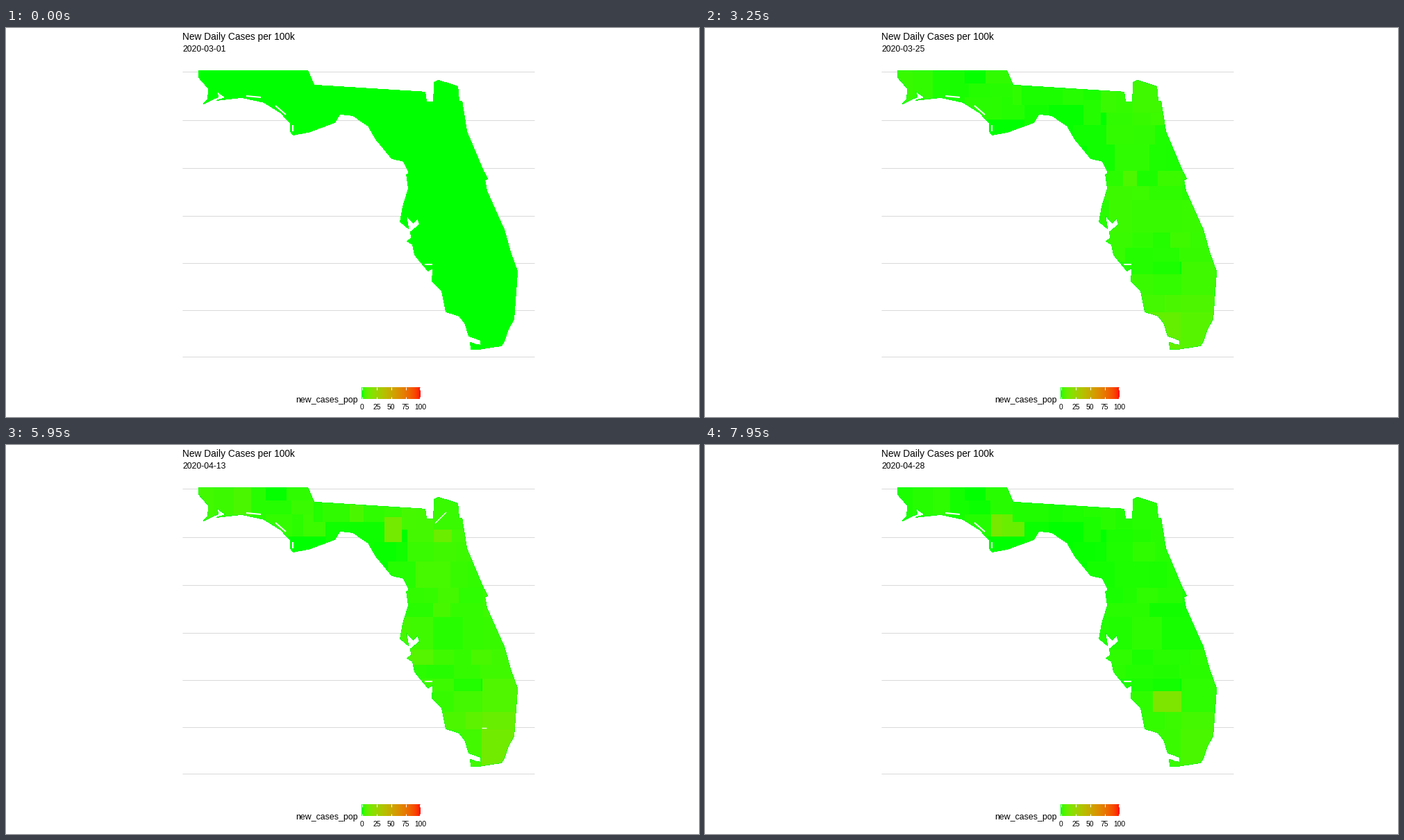
Animation, 998 px wide and 561 px high, one loop 8 s. Source, as a matplotlib script:

```python
import numpy as np
import matplotlib.pyplot as plt
from matplotlib.animation import FuncAnimation
from matplotlib.collections import LineCollection, PolyCollection
from matplotlib.patches import Polygon

W, H, DPI = 998, 561, 100
FRAMES, INTERVAL = 160, 50
DAYS_PER_FRAME = 0.3645
PX = 72 / DPI
FONT = "Liberation Sans"

# State outline, clockwise from the north-west corner
STATE = np.array([
    (278, 62), (435, 62), (444, 83), (604, 93), (606, 107), (616, 107), (617, 79),
    (623, 76), (651, 85), (653, 106), (657, 106), (664, 150), (688, 207), (694, 218),
    (690, 220), (693, 236), (718, 292), (727, 324), (737, 352), (732, 420),
    (723, 437), (718, 452), (714, 459), (682, 464), (670, 464), (669, 454),
    (677, 457), (684, 458), (684, 451), (667, 445), (661, 426), (653, 416),
    (634, 410), (628, 380), (614, 366), (615, 347), (608, 351), (589, 328),
    (586, 313), (578, 308), (584, 304), (583, 295), (596, 284), (593, 275),
    (587, 282), (577, 271), (580, 290), (568, 280), (572, 258), (580, 232),
    (577, 212), (581, 210), (573, 193), (556, 189), (533, 161), (522, 142),
    (500, 127), (481, 125), (474, 137), (436, 151), (414, 155), (410, 150),
    (410, 138), (396, 123), (372, 108), (340, 101), (304, 105), (317, 101),
    (304, 92), (306, 100), (285, 110), (291, 103), (292, 88), (278, 72)]) - (.4, .7)
BAYS = [[(346, 98), (367, 100)], [(388, 112), (403, 125)],
        [(603, 341), (614, 341)], [(413, 140), (413, 149)]]
CRACKS = [[(618, 113), (634, 97)], [(685, 408), (692, 408)]]

boxes = []


def row(y0, y1, *edges):
    """Cut a band of land into districts at the given x positions."""
    for x0, x1 in zip(edges, edges[1:]):
        boxes.append([(x0, y0), (x1, y0), (x1, y1), (x0, y1)])


row(60, 112, 270, 299, 328, 353, 380)
row(60, 80, 374, 404, 445)
row(80, 100, 380, 411, 445)
row(100, 132, 374, 412, 428, 460)
row(83, 111, 443, 456, 495, 515, 545)
row(111, 168, 460, 495, 550)
row(86, 104, 545, 578)
row(104, 140, 545, 570)
row(90, 122, 570, 591, 616)
row(74, 122, 616, 662)
row(122, 147, 578, 616, 642, 670)
row(140, 170, 530, 562, 578, 616, 648, 680)
row(168, 206, 550, 590, 640, 665, 700)
row(206, 228, 570, 602, 622, 652, 687, 700)
row(228, 248, 570, 615, 640, 687, 720)
row(248, 295, 560, 582, 615, 658, 687, 725)
row(295, 317, 574, 615, 645, 670, 699, 730)
row(317, 337, 580, 605, 645, 683, 740)
row(337, 355, 595, 645, 684)
row(337, 385, 686, 740)
row(355, 385, 610, 645, 686)
row(385, 410, 624, 662, 686, 740)
row(410, 468, 624, 685, 740)

QUIET = [(505, 140, 60), (560, 165, 30), (665, 345, 25), (392, 72, 22)]  # x, y, radius
FLARES = [(612, 217, 26, 5), (670, 445, 25, 7), (672, 270, 31, 5),
          (557, 122, 44, 12), (630, 134, 43, 9), (505, 97, 48, 9),
          (600, 306, 48, 10), (420, 110, 58, 13), (445, 115, 58, 10),
          (665, 370, 58, 15)]                                # x, y, day, peak


def bell(u):
    return np.exp(-u ** 2)


def daily_rates():
    """One spring wave, strongest in the south-east, with local flare-ups."""
    rng = np.random.default_rng(12)
    days = np.arange(62)[:, None]
    x, y = np.mean(boxes, axis=1).T
    wave = 4 * bell((days - 38) / 20) * np.minimum(1, days / 18) ** 2
    city = 2.2 * bell((x - 710) / 50) * bell((y - 440) / 90)
    base = rng.uniform(.3, 1.5, (len(days), len(x)))
    for qx, qy, r in QUIET:
        base *= 1 - bell(np.hypot(x - qx, y - qy) / r)
    rates = wave * (base + city)
    for fx, fy, day, peak in FLARES:
        i = np.argmin(np.hypot(x - fx, y - fy))
        rates[1:, i] += peak * bell((days[1:, 0] - day) / 5)
    return rates


def heat(v):
    """Green to red through CIE Lab for rates of 0 to 100."""
    t = np.clip(np.asarray(v, float) / 100, 0, 1)
    L, a, b = 87.735 - 34.494 * t, -86.183 + 166.275 * t, 83.180 - 15.977 * t
    fy = (L + 16) / 116
    f = np.stack([fy + a / 500, fy, fy - b / 200], -1)
    xyz = np.where(f > 6 / 29, f ** 3, (f - 4 / 29) * 108 / 841)
    xyz = xyz * [.95047, 1, 1.08883]
    m = np.array([[3.2406, -1.5372, -.4986], [-.9689, 1.8758, .0415],
                  [.0557, -.2040, 1.0570]])
    lin = np.clip(xyz @ m.T, 0, 1)
    rgb = np.where(lin > .0031308, 1.055 * lin ** (1 / 2.4) - .055, 12.92 * lin)
    return np.clip(rgb, 0, 1)


daily = daily_rates()

fig = plt.figure(figsize=(W / DPI, H / DPI), dpi=DPI, facecolor="white")
ax = fig.add_axes([0, 0, 1, 1])
ax.axis("off")


def label(x, y, text, px, ha="left"):
    return ax.text(x, y, text, fontsize=px * PX, family=FONT, ha=ha,
                   va="baseline", color="black")


def strokes(segments, width, z):
    lines = LineCollection(segments, colors="white", linewidths=width * PX, zorder=z)
    ax.add_collection(lines, autolim=False)
    return lines


# Parallels 31 to 25 degrees north, slightly closer towards the south
for i in range(7):
    y = round(62 + 70.2 * i - .27 * i * i) + .5
    ax.plot([254, 761], [y, y], color="#d9d9d9", lw=PX,
            solid_capstyle="butt", zorder=1)

state = Polygon(STATE, fc="#00ff00", ec="none", antialiased=False, zorder=2)
ax.add_patch(state)
districts = PolyCollection(boxes, edgecolors="none", antialiaseds=False, zorder=3)
ax.add_collection(districts, autolim=False)
districts.set_clip_path(state)
cracks = strokes(CRACKS, 1.3, 4)
strokes(BAYS, 2, 5)

label(254, 17, "New Daily Cases per 100k", 13.75)
date = label(254, 34, "", 12.3)

label(417, 540, "new_cases_pop", 12.45)
ax.imshow(heat(np.linspace(0, 100, 85))[None], extent=(512, 597, 535, 518),
          aspect="auto", interpolation="nearest", zorder=2)
for i in range(5):
    x = 513 + 20.85 * i
    for y in (518, 531.5):
        ax.plot([x, x], [y, y + 3.5], color="white", lw=PX,
                solid_capstyle="butt", zorder=3)
    label(x, 550, str(25 * i), 10.3, "center")

ax.set_xlim(0, W)
ax.set_ylim(H, 0)


def draw(frame):
    t = frame * DAYS_PER_FRAME
    day = int(t)
    mix = np.clip((t - day - .25) / .4, 0, 1)
    districts.set_facecolor(heat(daily[day] * (1 - mix) + daily[day + 1] * mix))
    # hairline gaps open between districts in most steps
    cracks.set_visible((2 * frame + 2) % 11 >= 3)
    d = round(t)
    date.set_text(f"2020-03-{d + 1:02d}" if d < 31 else f"2020-04-{d - 30:02d}")
    return districts, cracks, date


anim = FuncAnimation(fig, draw, frames=FRAMES, interval=INTERVAL,
                     init_func=lambda: draw(0), repeat=True, repeat_delay=0)
plt.show()
```
